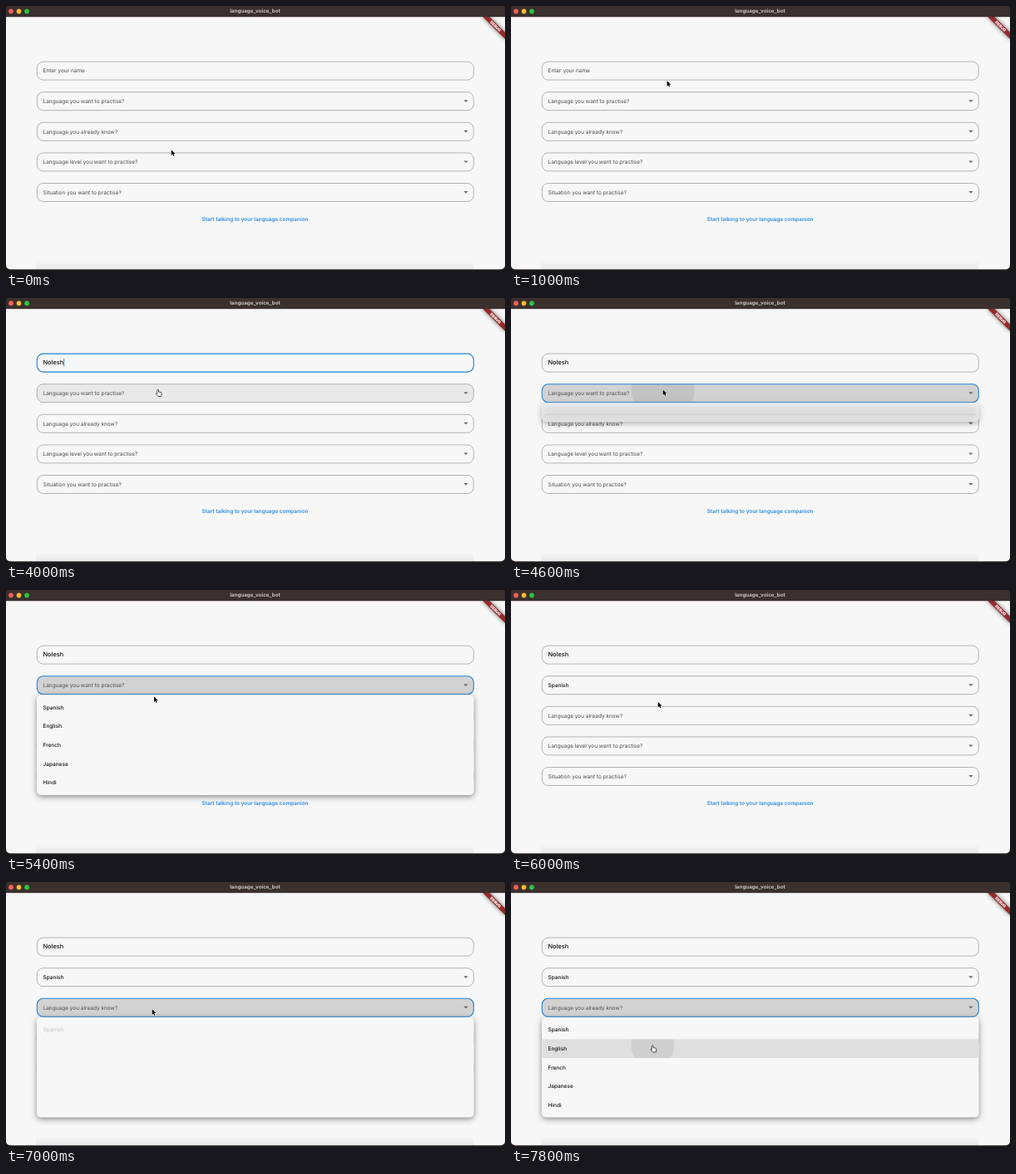
Write an HTML page with a canvas that moves like this. It is 600x318 px and loops after 8 s.

```html
<!DOCTYPE html>
<html lang="en">
<head>
<meta charset="utf-8">
<title>language_voice_bot</title>
<style>
  html, body { margin: 0; width: 100%; height: 100%; overflow: hidden; background: #151212; }
  canvas { display: block; width: 600px; height: 318px; }
</style>
</head>
<body>
<canvas></canvas>
<script>
const LOOP = 8000, STEP = 200;
const canvas = document.querySelector('canvas');
const ctx = canvas.getContext('2d');
const ratio = window.devicePixelRatio || 1;
canvas.width = 600 * ratio;
canvas.height = 318 * ratio;

const BLUE = '#2383d6', PAPER = '#f7f7f7', INK = '#111', HINT = '#4c4c4c';
const NAME = 'Nolesh';
const LANGUAGES = ['Spanish', 'English', 'French', 'Japanese', 'Hindi'];
const HINTS = ['Enter your name', 'Language you want to practise?', 'Language you already know?',
  'Language level you want to practise?', 'Situation you want to practise?'];
const LEFT = 37.3, WIDTH = 525, FIELD_H = 22, ROW_H = 22.6, PAD = 3.8;
const MENU_H = ROW_H * LANGUAGES.length + 2 * PAD;
const fieldTop = i => 67.1 + 36.6 * i;

// Pointer path: time, x, y
const PATH = [[300, 198.7, 173.3], [1200, 186, 78], [3200, 186, 78], [3900, 182.7, 110.5],
  [4700, 182.7, 110.5], [5400, 178, 128.3], [5600, 177, 137], [6000, 176.7, 134.8],
  [6200, 176.7, 134.8], [6700, 175.7, 153.3], [7050, 175.7, 153.3], [7600, 170.3, 197]];

// Menus: field index, opening and closing time
const MENUS = [{ field: 1, open: 4550, close: 5750 }, { field: 2, open: 6820, close: LOOP }];

const ARROW = new Path2D('M0 0V6.6L1.5 5.2L2.6 7.5L3.7 7L2.7 4.8H4.7Z');
const HAND = new Path2D('M-.9 4V.5Q-.8-.3 0-.3Q.8-.3.8.5V2.6L3.9 3.3Q4.8 3.7 4.6 4.8L3.9 8H.3L-2.3 5Q-2.4 3.8-.9 4.7Z');
const BEAM = new Path2D('M-1.5-3.6Q0-3.6 0-2.8Q0-3.6 1.5-3.6M0-2.8V2.8M-1.5 3.6Q0 3.6 0 2.8Q0 3.6 1.5 3.6');

const clamp = v => Math.min(1, Math.max(0, v));
const span = (v, a, b) => clamp((v - a) / (b - a));
const within = (v, a, b) => v >= a && v < b;

function pointerAt(t) {
  const next = PATH.findIndex(p => p[0] > t);
  if (next === 0) return PATH[0].slice(1);
  if (next < 0) return PATH[PATH.length - 1].slice(1);
  const a = PATH[next - 1], b = PATH[next];
  const u = span(t, a[0], b[0]), k = u * u * (3 - 2 * u);
  return [a[1] + (b[1] - a[1]) * k, a[2] + (b[2] - a[2]) * k];
}

function roundRect(x, y, w, h, r) {
  ctx.beginPath();
  ctx.roundRect(x, y, w, h, r);
}

function text(str, x, y, size, color, weight = 400, align = 'left') {
  ctx.font = `${weight} ${size}px Inter, sans-serif`;
  ctx.textAlign = align;
  ctx.fillStyle = color;
  ctx.fillText(str, x, y + size * 0.36);
}

function ripple(t, start, x, y) {
  if (!within(t, start, start + 400)) return;
  ctx.beginPath();
  ctx.arc(x, y, 8 + (t - start) * 0.12, 0, 7);
  ctx.fillStyle = 'rgba(0,0,0,.07)';
  ctx.fill();
}

function drawField(i, t, x, y, menuOpen) {
  const top = fieldTop(i), mid = top + FIELD_H / 2;
  const hovered = !menuOpen && within(y, top, top + FIELD_H);
  const focused = [within(t, 1300, 4500), within(t, 4500, 5850), t >= 6700][i];

  ctx.save();
  roundRect(LEFT, top, WIDTH, FIELD_H, 7.5);
  if (i) {
    ctx.save();
    ctx.clip();
    if (focused || hovered) {
      ctx.fillStyle = focused ? '#d2d2d2' : '#e9e9e9';
      ctx.fill();
    }
    if (i === 1) ripple(t, 4350, x, y);
    if (i === 2) ripple(t, 6600, x, y);
    ctx.restore();
    roundRect(LEFT, top, WIDTH, FIELD_H, 7.5);
  }
  ctx.lineWidth = focused ? 1.1 : 0.7;
  ctx.strokeStyle = focused ? BLUE : !i && hovered ? '#555' : '#959595';
  ctx.stroke();
  ctx.restore();

  if (i) {
    const chosen = i === 1 && t >= MENUS[0].close;
    if (chosen) text(LANGUAGES[0], 44.5, mid, 6.5, INK, 500);
    else text(HINTS[i], 44.5, mid, 6.5, HINT);
    ctx.beginPath();
    ctx.moveTo(550.2, mid - 1.5);
    ctx.lineTo(555.6, mid - 1.5);
    ctx.lineTo(552.9, mid + 1.2);
    ctx.fillStyle = '#6c6c6c';
    ctx.fill();
    return;
  }
  const typed = NAME.slice(0, Math.round(6 * span(t, 2000, 3000)));
  if (typed) text(typed, 44.5, mid - 0.6, 7.4, INK, 500);
  else text(HINTS[0], 44.5, mid, 6.5, HINT);
  if (within(t, 1300, 1900) || within(t, 2100, 3500) || within(t, 4000, 4500)) {
    ctx.fillStyle = BLUE;
    ctx.fillRect(44.6 + (typed && ctx.measureText(typed).width), mid - 5, 0.9, 9.2);
  }
}

// The panel fades in, grows downwards, then its rows appear one by one.
function drawMenu({ field, open, close }, t, x, y) {
  const p = span(t, open, open + 300);
  const alpha = Math.min(span(p, 0, 0.25), 1 - span(t, close, close + 75));
  if (!alpha) return;
  const top = fieldTop(field) + FIELD_H + 0.6;
  const height = ROW_H + (MENU_H - ROW_H) * span(p, 0.25, 0.5);
  const unit = 0.5 / (LANGUAGES.length + 1.5);

  ctx.save();
  ctx.globalAlpha = alpha;
  ctx.save();
  ctx.shadowColor = 'rgba(0,0,0,.45)';
  ctx.shadowBlur = 7 * ratio;
  ctx.shadowOffsetY = 2 * ratio;
  ctx.fillStyle = PAPER;
  roundRect(LEFT - 0.3, top, WIDTH + 0.6, height, 5);
  ctx.fill();
  ctx.restore();
  ctx.clip();

  LANGUAGES.forEach((label, i) => {
    const rowTop = top + PAD + i * ROW_H, start = 0.5 + (i + 1) * unit;
    ctx.globalAlpha = alpha * span(p, start, start + 1.5 * unit);
    if (p === 1 && within(y, rowTop, rowTop + ROW_H)) {
      ctx.save();
      ctx.beginPath();
      ctx.rect(LEFT, rowTop, WIDTH, ROW_H);
      ctx.clip();
      ctx.fillStyle = t >= 7650 || within(t, 5650, 6000) ? '#dfdfdf' : '#ececec';
      ctx.fill();
      ripple(t, field === 1 ? 5650 : 7650, x, y);
      ctx.restore();
    }
    text(label, 44.5, rowTop + ROW_H / 2, 6.5, INK, 500);
  });
  ctx.restore();
}

function drawBanner() {
  ctx.save();
  ctx.translate(600, 13);
  ctx.rotate(Math.PI / 4);
  ctx.shadowColor = 'rgba(0,0,0,.6)';
  ctx.shadowBlur = 5 * ratio;
  ctx.fillStyle = '#962a2a';
  ctx.fillRect(-19, 13.2, 38, 5.7);
  ctx.shadowColor = 'transparent';
  text('DEBUG', 0, 16, 4.7, '#fff', 900, 'center');
  ctx.restore();
}

function drawPointer(kind, x, y) {
  ctx.save();
  ctx.translate(x, y);
  ctx.lineJoin = 'round';
  if (kind === 'beam') {
    ctx.lineWidth = 0.9;
    ctx.strokeStyle = '#111';
    ctx.stroke(BEAM);
  } else {
    const hand = kind === 'hand';
    ctx.lineWidth = hand ? 0.8 : 1;
    ctx.strokeStyle = hand ? '#222' : '#fff';
    ctx.fillStyle = hand ? '#fff' : '#000';
    if (!hand) ctx.stroke(ARROW);
    ctx.fill(hand ? HAND : ARROW);
    if (hand) ctx.stroke(HAND);
  }
  ctx.restore();
}

function pointerKind(y, menu) {
  if (menu) {
    const rows = fieldTop(menu.field) + FIELD_H + PAD;
    return within(y, rows, rows + MENU_H - 2 * PAD) ? 'hand' : 'arrow';
  }
  const i = HINTS.findIndex((_, n) => within(y, fieldTop(n), fieldTop(n) + FIELD_H));
  return i < 0 ? 'arrow' : i ? 'hand' : 'beam';
}

function draw(t) {
  const [x, y] = pointerAt(t);
  const menu = MENUS.find(m => within(t, m.open, m.close));
  ctx.setTransform(ratio, 0, 0, ratio, 0, 0);
  ctx.textRendering = 'geometricPrecision';
  ctx.fillStyle = '#241616';
  ctx.fillRect(0, 0, 600, 318);

  ctx.save();
  roundRect(0, 0, 600, 317.2, [3, 3, 5, 5]);
  ctx.clip();
  ctx.fillStyle = PAPER;
  ctx.fillRect(0, 13, 600, 305);
  const fade = ctx.createLinearGradient(0, 306, 0, 317);
  fade.addColorStop(0, 'rgba(0,0,0,0)');
  fade.addColorStop(1, 'rgba(0,0,0,.06)');
  ctx.fillStyle = fade;
  ctx.fillRect(36, 306, 526, 12);

  HINTS.forEach((_, i) => drawField(i, t, x, y, menu));
  text('Start talking to your language companion', 299.5, 257, 6.45, '#2a8ce2', 600, 'center');
  MENUS.forEach(m => drawMenu(m, t, x, y));
  drawBanner();

  ctx.fillStyle = '#3a302e';
  ctx.fillRect(0, 0, 600, 13.2);
  ['#fe5f57', '#febc2e', '#28c840'].forEach((color, i) => {
    ctx.beginPath();
    ctx.arc(6 + 9.5 * i, 6.4, 2.8, 0, 7);
    ctx.fillStyle = color;
    ctx.fill();
  });
  text('language_voice_bot', 299.5, 6.2, 6.25, '#cbc5c3', 700, 'center');
  ctx.restore();

  drawPointer(pointerKind(y, menu), x, y);
}

function tick() {
  draw(Math.floor(performance.now() % LOOP / STEP) * STEP);
  requestAnimationFrame(tick);
}
tick();
</script>
</body>
</html>
```
